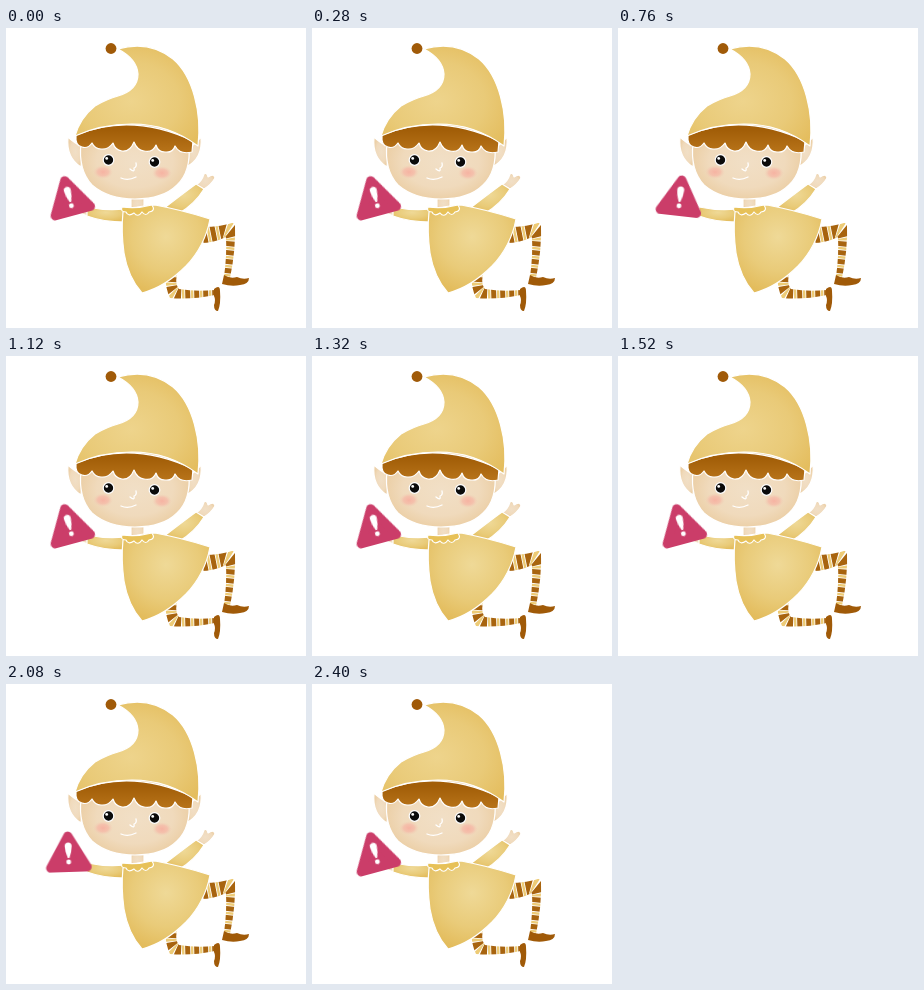
An HTML page without scripts for the animation above (2.44 s loop, 300 by 300 pixels).

```html
<!DOCTYPE html>
<html lang="en">
<head>
<meta charset="utf-8">
<title>Elf with a warning sign</title>
<style>
  html, body { margin: 0; width: 100%; height: 100%; overflow: hidden; background: #fff; }
  svg { display: block; width: 100vw; height: 100vh; }
  .outlined { stroke: #fff; stroke-width: 1.2; stroke-linejoin: round; stroke-linecap: round; }
  .line { fill: none; stroke: #fff; stroke-width: 1.3; stroke-linecap: round; stroke-linejoin: round; }
  .stripes { fill: none; stroke: #a8640f; stroke-width: 22; stroke-dasharray: 5 4; }
  .stripes.light { stroke: #edcb76; stroke-dasharray: 2.4 6.6; stroke-dashoffset: -5.8; }
  .shoe { fill: #a05a08; }
  .sign { transform-origin: 63px 166px; animation: rock 1220ms linear infinite; }
  @keyframes rock {
    0%, 25% { transform: rotate(-15deg); }
    31% { transform: rotate(-10deg); }
    38% { transform: rotate(1deg); }
    43% { transform: rotate(4deg); }
    52%, 60% { transform: rotate(7deg); }
    64% { transform: rotate(6deg); }
    70.5% { transform: rotate(-2deg); }
    79% { transform: rotate(-11deg); }
    87%, 100% { transform: rotate(-15deg); }
  }
</style>
</head>
<body>
<svg viewBox="0 0 300 300">
  <defs>
    <radialGradient id="gold" cx="45%" cy="55%" r="65%">
      <stop offset="0" stop-color="#eed48c"/>
      <stop offset=".6" stop-color="#e9ca78"/>
      <stop offset="1" stop-color="#e4bd5e"/>
    </radialGradient>
    <radialGradient id="cloth" cx="50%" cy="36%" r="65%">
      <stop offset="0" stop-color="#efd997"/>
      <stop offset=".6" stop-color="#e9cb79"/>
      <stop offset="1" stop-color="#e3bc5c"/>
    </radialGradient>
    <radialGradient id="skin">
      <stop offset="0" stop-color="#f1dfc6"/>
      <stop offset=".7" stop-color="#f0dabc"/>
      <stop offset="1" stop-color="#ecd0a8"/>
    </radialGradient>
    <radialGradient id="blush">
      <stop offset="0" stop-color="#f6b3a2"/>
      <stop offset=".55" stop-color="#f5bba8" stop-opacity=".8"/>
      <stop offset="1" stop-color="#f1d0b6" stop-opacity="0"/>
    </radialGradient>
    <linearGradient id="hair" x2="0" y2="1">
      <stop offset=".2" stop-color="#a25e08"/>
      <stop offset="1" stop-color="#b8741a"/>
    </linearGradient>
    <g id="eye">
      <circle r="5.3" fill="#0b0b0b" class="outlined"/>
      <circle cx="-1.8" cy="-1.6" r="1.4" fill="#fff"/>
    </g>
    <clipPath id="backLeg">
      <path d="M196 199 Q216 199 229 194 Q230 222 224 250 L218 249 Q221 227 220 209 Q208 215 194 215 Z"/>
    </clipPath>
    <clipPath id="frontLeg">
      <path d="M160 242 L172 242 Q168 255 173 261 Q190 264 209 262 L209 267 Q185 272 164 270 Q158 257 160 242 Z"/>
    </clipPath>
    <path id="backLegLine" d="M196 207 L216 203 Q226 204 225 214 L221 250"/>
    <path id="frontLegLine" d="M166 240 L165 255 Q165 266 176 266 L210 265"/>
  </defs>

  <g id="legs">
    <g clip-path="url(#backLeg)">
      <use href="#backLegLine" class="stripes"/>
      <use href="#backLegLine" class="stripes light"/>
    </g>
    <g clip-path="url(#frontLeg)">
      <use href="#frontLegLine" class="stripes"/>
      <use href="#frontLegLine" class="stripes light"/>
    </g>
    <path class="shoe" d="M218 247 Q224 251 231 249 Q237 252 243 250 Q243 256 234 257 Q226 259 216 256 Z"/>
    <path class="shoe" d="M208 261 Q214 256 214 263 Q215 276 212 283 Q208 283 208 277 Q210 272 208 268 Z"/>
  </g>

  <g id="arms" class="outlined">
    <path fill="url(#skin)" d="M190 157 Q196 153 198 146 Q201 144 202 149 Q208 145 209 150 Q205 157 198 161 Z"/>
    <path fill="url(#cloth)" d="M157 181 Q175 167 190 156 L198 161 Q189 176 172 186 Z"/>
    <path fill="url(#skin)" d="M74 179 L86 179 L86 189 L76 186 Z"/>
    <path fill="url(#cloth)" d="M81 179 Q100 183 119 181 L119 194 Q97 194 81 188 Z"/>
  </g>

  <path class="outlined" fill="url(#skin)" d="M125 168 H138 V183 H125 Z"/>
  <path class="outlined" fill="url(#cloth)" d="M117 184 Q133 177 149 177 Q176 182 204 191 Q199 218 180 238 Q159 259 136 265 Q122 249 118 225 Q115 203 117 184 Z"/>
  <path class="outlined" fill="#e7c158" d="M116 179 Q131 181 146 177 Q150 183 143 184 Q140 189 136 184 Q132 190 128 185 Q122 189 120 184 Q114 184 116 179 Z"/>

  <g id="head">
    <path class="outlined" fill="url(#skin)" d="M77 119 Q68 115 62 109 Q60 130 75 139 Z"/>
    <path class="outlined" fill="url(#skin)" d="M181 121 Q190 116 195 109 Q197 131 180 139 Z"/>
    <path class="outlined" fill="url(#skin)" d="M75 115 Q72 142 86 157 Q102 171 129 171 Q157 171 171 157 Q185 144 183 117 Q164 96 129 96 Q91 96 75 115 Z"/>
    <ellipse cx="97" cy="144" rx="10" ry="7" fill="url(#blush)"/>
    <ellipse cx="156" cy="145" rx="10" ry="7" fill="url(#blush)"/>
    <use href="#eye" x="102.5" y="132"/>
    <use href="#eye" x="148.5" y="134"/>
    <path class="line" d="M124 141 Q129 145 128 140 Q131 139 130 135 M115 150 Q122 153 130 149"/>
    <path class="outlined" fill="url(#hair)" d="M70 107 Q126 84 187 113 L186 124 Q174 127 169 118 Q167 125 159 124 Q152 124 150 117 Q147 125 138 123 Q131 122 128 114 Q124 124 116 123 Q109 122 107 115 Q102 122 95 121 Q89 121 86 115 Q82 121 76 119 Q69 118 70 107 Z"/>
    <path class="outlined" fill="url(#gold)" d="M69 108 Q74 90 89 78 Q101 71 112 68 Q132 62 132 46 Q131 31 112 21 Q143 12 167 31 C187 48 196 85 192 118 Q163 96 126 96 Q95 96 69 108 Z"/>
    <circle cx="105" cy="20.5" r="5.4" fill="#a05a08"/>
  </g>

  <g class="sign">
    <path d="M62.3 152 L44 183.5 H80.6 Z" fill="#cb3d69" stroke="#cb3d69" stroke-width="9" stroke-linejoin="round"/>
    <path d="M58.8 162 Q59 158.5 62.3 158.5 Q65.7 158.5 65.8 162 Q65.6 168 63.2 174 H61.6 Q59 168 58.8 162 Z" fill="#fff"/>
    <circle cx="62.3" cy="178" r="2.4" fill="#fff"/>
  </g>
</svg>
</body>
</html>
```
